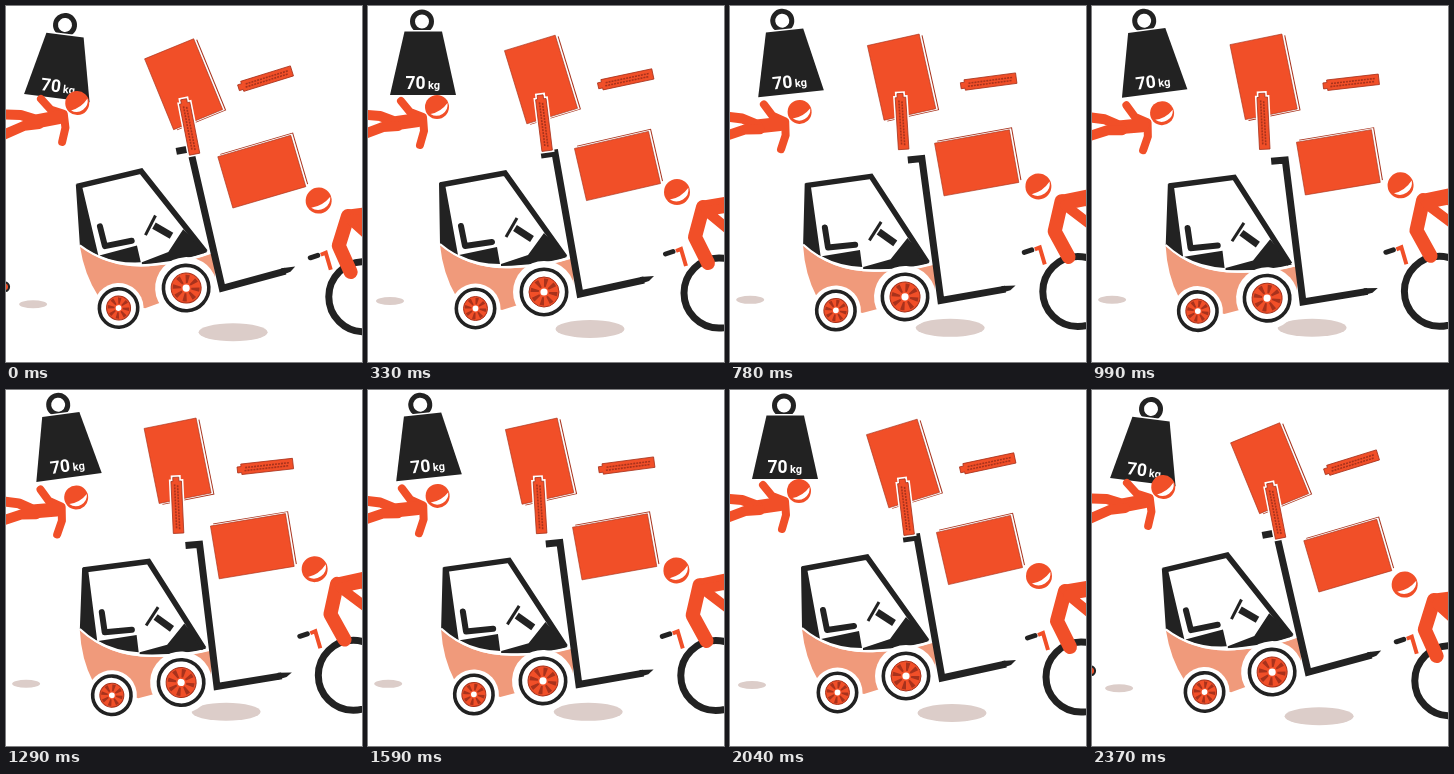
These frames come from a looping animation (356x356 px, 2400 ms). An HTML page:

```html
<!DOCTYPE html>
<html lang="en">
<head>
<meta charset="utf-8">
<title>Floating cargo</title>
<style>
  html, body { margin: 0; width: 100%; height: 100%; overflow: hidden; background: #fff; }
  svg { display: block; width: 100vw; height: 100vh; }
  .line { fill: none; stroke: #222; }
  .round { stroke-linecap: round; stroke-linejoin: round; }
  text { fill: #fff; font-family: Roboto, sans-serif; font-weight: 700; }
</style>
</head>
<body>
<svg viewBox="0 0 356 356" id="stage"></svg>
<script>
const ORANGE = '#f14f28', DARK = '#222', RUST = '#a8321c';
const LOOP = 2400, STEP = 30, TURN = (LOOP - STEP) / 2;

const limb = (d, width) =>
  `<path class="round" fill="none" stroke="${ORANGE}" stroke-width="${width}" d="${d}"/>`;

const head = (x, y, r) => `<g transform="translate(${x} ${y}) scale(${r / 12})">
  <circle r="12" fill="${ORANGE}"/>
  <path fill="#fff" d="M-6.5 7Q4 5 10.5-4A11.2 11.2 0 0 1-6.5 7Z"/></g>`;

const box = (x, y, w, h, angle, lift) => `<g transform="translate(${x} ${y}) rotate(${angle}) translate(${-w / 2} ${-h / 2})">
  <rect x="3" y="${lift}" width="${w}" height="${h}" fill="${RUST}"/>
  <rect x="2" y="${lift * .6}" width="${w}" height="${h}" fill="#fff"/>
  <rect width="${w}" height="${h}" fill="${ORANGE}" stroke="${RUST}" stroke-width=".6"/></g>`;

const slab = (x, y, angle) => `<g transform="translate(${x} ${y}) rotate(${angle})">
  <path d="M-5-24H-3V-28H3V-24H5.5V28H-5Z" fill="${ORANGE}" stroke="#fff" stroke-width="4" paint-order="stroke"/>
  <path d="M-5-24H-3V-28H3V-24H5.5V28H-5Z" fill="none" stroke="${RUST}" stroke-width=".8"/>
  <path d="M-1.5-21V24M1.5-20V24" fill="none" stroke="${RUST}" stroke-width="1.6" stroke-dasharray="2 1"/></g>`;

const wheel = (x, y, r, hub, halo) => `<g transform="translate(${x} ${y})">
  <circle r="${halo}" fill="#fff"/>
  <circle class="line" r="${r - 1.8}" stroke-width="3.6"/>
  <circle r="${hub}" fill="${ORANGE}" stroke="${RUST}" stroke-width="1"/>
  <circle r="${hub * .62}" fill="none" stroke="${RUST}" stroke-width="${hub * .55}" pathLength="32" stroke-dasharray="1.7 2.3"/>
  <circle r="${hub * .24}" fill="#fff"/></g>`;

const forklift = `
  <path fill="#f09a7b" d="M72 239Q103 265 147 262Q178 261 206 252L205 289L150 299L134 304L88 290Q75 268 72 239Z"/>
  <path fill="${DARK}" d="M71 177L77 178L90 249Q80 245 72 238ZM91 249L129 241L132 258Q109 258 91 249ZM133 258L160 249L176 227L199 251Q175 259 133 260Z"/>
  <path class="line" stroke-width="5.5" d="M72 179L137 167L197 251"/>
  <path class="line round" stroke-width="6" d="M93 220L97 240L124 236"/>
  <path class="line" stroke-width="3" d="M138 231L149 212"/>
  <path class="line" stroke-width="7" d="M147 222L164 233"/>
  <path fill="none" stroke="#fff" stroke-width="2" d="M72 238Q103 264 147 261Q178 260 204 251"/>
  ${wheel(107.5, 302.5, 21, 12, 25)}${wheel(176, 286, 24.5, 15, 31)}
  <path class="line" stroke-width="7" d="M173 149L187 147L212 288L276 274"/>
  <path fill="${DARK}" d="M272 271L286 270L281 275L272 278Z"/>`;

const weight = `
  <circle class="line" cx="54" cy="15.5" r="9.5" stroke-width="5"/>
  <path fill="${DARK}" stroke="#fff" stroke-width="3" paint-order="stroke" d="M36.5 25.5H74L88 89H22Z"/>
  <text x="37.5" y="83" font-size="17.5">70</text><text x="60" y="83" font-size="11">kg</text>`;

const flyer = limb('M33 95L42 106L55 111L56 125L52 139', 8) + limb('M50 114L29 117', 14)
  + limb('M28 116L12 110L-14 108', 10) + limb('M30 120L15 121L-14 132', 10) + head(69, 101, 12);

const rider = limb('M335 201L327 231L340 257', 14) + limb('M336 200L372 194', 11)
  + limb('M338 205L364 201L366 228Z', 10);

const ground = `
  <g fill="#dccdc9"><ellipse cx="22" cy="295" rx="14" ry="4"/><ellipse cx="222" cy="323" rx="34.5" ry="9"/></g>
  <circle cx="-6.5" cy="277.5" r="4.5" fill="${ORANGE}" stroke="${DARK}" stroke-width="2"/>`;

const bike = `
  <circle class="line" cx="351" cy="287" r="35" stroke-width="7"/>
  <path class="line round" stroke-width="5" d="M297.5 248L305 245.5"/>
  <path fill="none" stroke="${ORANGE}" stroke-width="4" d="M308 245L313 243L318 260"/>`;

// Every part follows the camera pan and adds its own sway: drift by (dx, dy), spin around (x, y).
const parts = [
  { art: ground, x: 0, y: 0, dx: 0, dy: 0, spin: 0 },
  { art: forklift, x: 176, y: 286, dx: 2, dy: 15, spin: 6 },
  { art: box(173, 73.5, 53, 76.5, -17, 2), x: 173, y: 73.5, dx: 1, dy: -3, spin: 11 },
  { art: box(249.5, 160, 76, 53.5, -13, -2), x: 249.5, y: 160, dx: -2.5, dy: -5, spin: 7 },
  { art: slab(175.5, 117, -7), x: 175.5, y: 117, dx: -5, dy: -1, spin: 8.5 },
  { art: slab(257.5, 74, -102), x: 257.5, y: 74, dx: 7, dy: 8, spin: 11 },
  { art: weight, x: 55, y: 57, dx: 11, dy: 0, spin: -15 },
  { art: flyer, x: 69, y: 101, dx: 6, dy: 15, spin: 6 },
  { art: bike, x: 351, y: 287, dx: -3.5, dy: -1, spin: 0 },
  { art: rider, x: 339, y: 258, dx: 1, dy: -12, spin: -5 },
  { art: head(309, 186, 13), x: 309, y: 186, dx: 3, dy: -11, spin: -6 }
];

const stage = document.getElementById('stage');
stage.innerHTML = parts.map(p => `<g>${p.art}</g>`).join('');

// Progress of an ease-out, measured from the moment the parts are drawn for.
const easeOut = (t, power) => 1 - (1 - t / TURN) ** power;
const progress = (t, power) => easeOut(t, power) - easeOut(330, power);

function draw() {
  const step = Math.floor(performance.now() % LOOP / STEP) * STEP;
  const t = Math.min(step, LOOP - STEP - step);
  const pan = progress(t, 4), sway = progress(t, 2);
  parts.forEach(({ x, y, dx, dy, spin }, i) => {
    stage.children[i].setAttribute('transform',
      `translate(${dx * sway - 7 * pan} ${dy * sway - 4.5 * pan}) rotate(${spin * sway} ${x} ${y})`);
  });
  requestAnimationFrame(draw);
}
draw();
</script>
</body>
</html>
```
